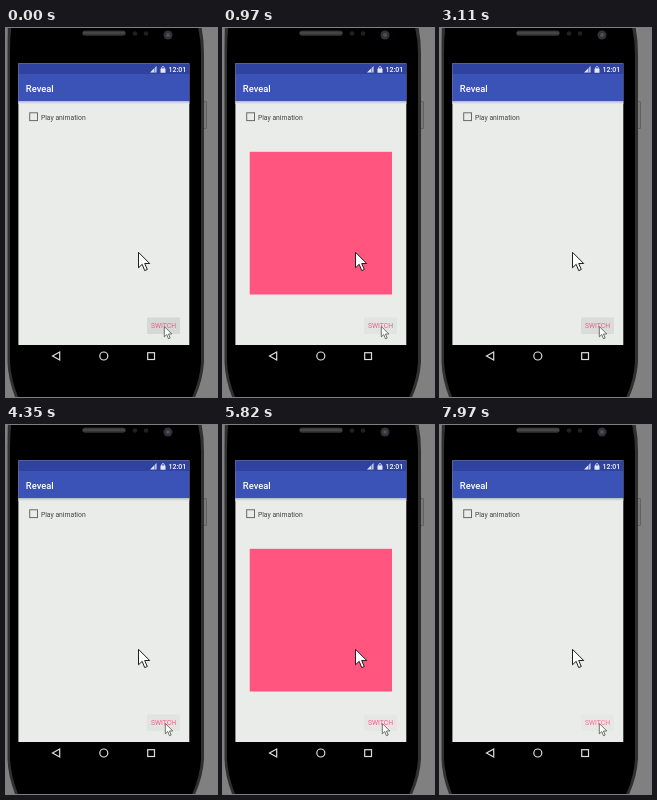
An HTML page with a canvas for the animation above (8000 ms loop, 211x369 px).

```html
<!DOCTYPE html>
<html lang="en">
<head>
<meta charset="utf-8">
<title>Reveal</title>
<style>
  html, body { margin: 0; width: 100%; height: 100%; overflow: hidden; background: #808080; }
  canvas { display: block; width: 211px; height: 369px; }
</style>
</head>
<body>
<canvas id="stage" width="211" height="369"></canvas>
<script>
const ctx = document.getElementById('stage').getContext('2d');
const LOOP = 8000;
const PAGE = '#eaecea';
const PINK = '#f65a88';

// Button states: start time, fill, label colour
const buttonStates = [
  [0, '#d6d8d5', PINK],
  [970, '#e1e4e0', PINK],
  [1090, '#e5e7e4', PINK],
  [2840, '#e2e4e1', PINK],
  [2960, '#dadcd9', PINK],
  [3260, '#e5e7e4', PINK],
  [4350, '#e2e4e1', PINK],
  [4470, '#dcdedb', PINK],
  [4590, '#e5e7e4', PINK],
  [7730, '#e6e8e5', PINK],
  [7970, '#e6e8e5', '#fa6c94']
];
const panelTimes = [[970, 3110], [4470, 7730]];

function rect(x, y, w, h, color) {
  ctx.fillStyle = color;
  ctx.fillRect(x, y, w, h);
}

function disc(x, y, r, color) {
  ctx.fillStyle = color;
  ctx.beginPath();
  ctx.arc(x, y, r, 0, Math.PI * 2);
  ctx.fill();
}

function round(x, y, w, h, r, color) {
  ctx.fillStyle = color;
  ctx.beginPath();
  ctx.roundRect(x, y, w, h, r);
  ctx.fill();
}

function text(str, x, y, size, weight, color) {
  ctx.font = `${weight} ${size}px Roboto, sans-serif`;
  ctx.fillStyle = color;
  ctx.fillText(str, x, y);
}

function shape(d, fill, stroke, width = 1) {
  const path = new Path2D(d);
  if (fill) {
    ctx.fillStyle = fill;
    ctx.fill(path);
  }
  if (stroke) {
    ctx.strokeStyle = stroke;
    ctx.lineWidth = width;
    ctx.stroke(path);
  }
}

function drawPhone() {
  rect(0, 0, 211, 369, '#808080');
  round(197, 73, 4, 28, 1.5, '#606060');
  rect(198, 74, 2, 26, '#787878');
  shape('M2 -8 Q1.5 8 1.5 26 V334 Q2 354 12 376 H186 Q197 354 198 334 V26 Q198 8 194 -8 Z', '#303030');
  shape('M6 -8 Q4 8 4 26 V334 Q5 354 15 376 H183 Q194 354 195 334 V26 Q195 8 190 -8 Z', '#000');

  const grille = ctx.createLinearGradient(0, 2, 0, 8);
  grille.addColorStop(0, '#242424');
  grille.addColorStop(0.5, '#4c4c4c');
  grille.addColorStop(1, '#202020');
  round(76.5, 2.5, 43, 5.5, 2.7, grille);
  disc(129, 5.5, 2.3, '#202020');
  disc(140, 5.5, 2.3, '#202020');
  disc(162, 7, 4.5, '#303236');
  disc(162, 7, 2, '#4c5056');
}

function drawScreen() {
  rect(12.4, 35.3, 170.9, 281.7, PAGE);
  rect(12.4, 35.3, 170.9, 11.2, '#3042a0');
  rect(12.4, 46, 170.9, 27, '#3b52b7');
  const shadow = ctx.createLinearGradient(0, 73, 0, 76);
  shadow.addColorStop(0, '#b4b8c6');
  shadow.addColorStop(1, PAGE);
  rect(12.4, 73, 170.9, 3, shadow);

  shape('M144 44.5 L150.5 38 V44.5 Z', '#dfe3f4');
  rect(148.5, 38, 0.7, 6.5, '#3042a0');
  round(154.5, 40.5, 5, 4.2, 0.5, '#e4e7f5');
  shape('M155.7 41 V39.5 Q157 37.2 158.3 39.5 V41', null, '#e4e7f5', 0.9);
  text('12:01', 162.5, 44, 7, 500, '#fff');
  text('Reveal', 19.8, 63.8, 9.4, 500, '#fff');

  ctx.strokeStyle = '#686a68';
  ctx.lineWidth = 1;
  ctx.strokeRect(23.7, 84.8, 7.8, 7.8);
  text('Play animation', 34.9, 91.5, 6.8, 400, '#424442');

  shape('M53.7 324 V332 L46.5 328 Z', null, '#ddd', 1.2);
  ctx.strokeStyle = '#ddd';
  ctx.beginPath();
  ctx.arc(97.8, 328, 4, 0, Math.PI * 2);
  ctx.stroke();
  ctx.strokeRect(141.7, 324.7, 6.8, 6.8);
}

function drawButton(t) {
  const [, fill, label] = buttonStates.findLast(state => state[0] <= t);
  round(141, 289.5, 33, 16.5, 1, fill);
  if (t >= 150 && t < 820) disc(156, 297.5, 4, '#d2d4d1');
  text('SWITCH', 145, 300.2, 6.8, 400, label);
}

function drawCursor(x, y, scale, outline, lineWidth) {
  ctx.save();
  ctx.translate(x, y);
  ctx.scale(scale, scale);
  shape('M0 0 V15.5 L3.7 12 L6.2 18.3 L8.8 17.2 L6.2 11.2 H11.2 Z', '#fff', outline, lineWidth / scale);
  ctx.restore();
}

function draw(now) {
  const t = now % LOOP;
  drawPhone();
  drawScreen();
  if (panelTimes.some(([from, to]) => t >= from && t < to)) {
    rect(26.7, 123.8, 142.3, 142.7, '#ff557e');
  }
  drawButton(t);
  drawCursor(132.5, 224.3, 1, '#202020', 1);
  drawCursor(t < 1480 ? 158.3 : 159.3, 298.5, 0.67, '#505050', 0.8);
}

const start = performance.now();
function tick() {
  draw(performance.now() - start);
  requestAnimationFrame(tick);
}
tick();
</script>
</body>
</html>
```
